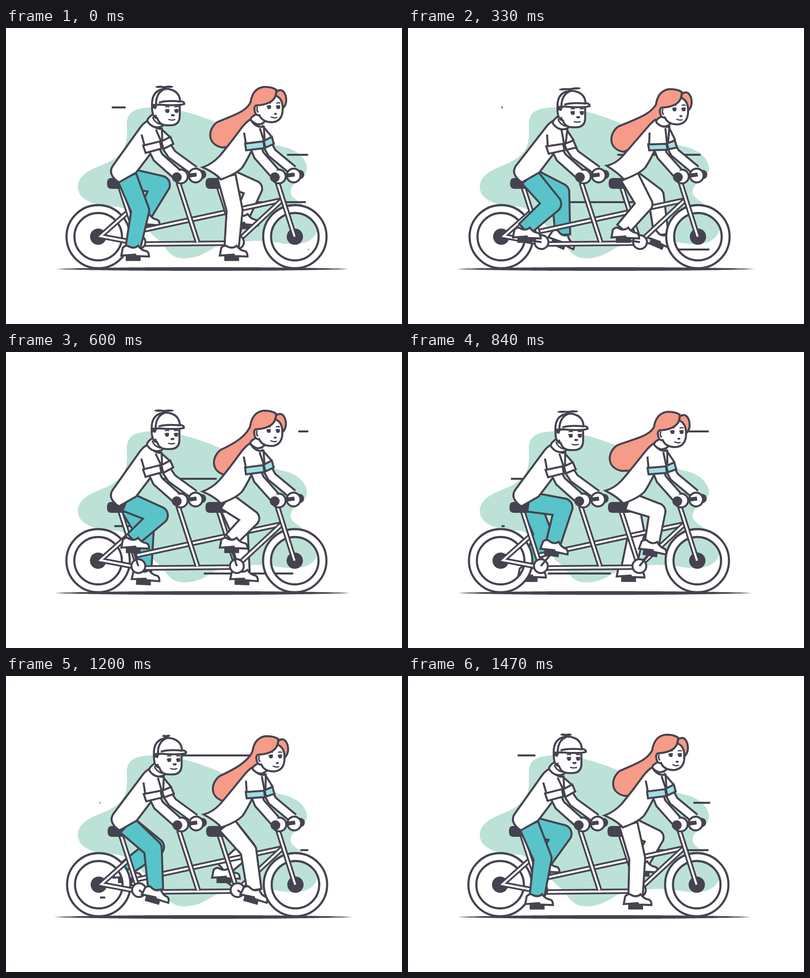
An HTML page with a canvas for the animation above (1.5 s loop, 800 by 600 pixels).

```html
<!DOCTYPE html>
<html lang="en">
<head>
<meta charset="utf-8">
<title>Tandem ride</title>
<style>
html, body { margin: 0; width: 100%; height: 100%; overflow: hidden; background: #fff }
canvas { display: block }
</style>
</head>
<body>
<canvas id="stage" width="800" height="600"></canvas>
<script>
const ctx = document.getElementById('stage').getContext('2d');
const INK = '#45434f', WHITE = '#fff', TEAL = '#58c4c9', MINT = '#bce2d8', CORAL = '#f59b88', AQUA = '#9fdfe2';
const LOOP = 1500, RAD = Math.PI / 180;

const wave = (t, peak) => Math.cos((t - peak) / 750 * 2 * Math.PI);

function shape(d, fill, width = 4) {
  const path = new Path2D(d);
  if (fill) { ctx.fillStyle = fill; ctx.fill(path); }
  if (width) { ctx.strokeStyle = INK; ctx.lineWidth = width; ctx.stroke(path); }
}

function disc(x, y, r, fill = INK, width = 0, ry = r) {
  ctx.beginPath();
  ctx.ellipse(x, y, r, ry, 0, 0, 7);
  ctx.fillStyle = fill;
  ctx.fill();
  if (width) { ctx.strokeStyle = INK; ctx.lineWidth = width; ctx.stroke(); }
}

// A white bar with an outline on both sides.
function tube(d, outer = 11, inner = 4) {
  const path = new Path2D(d);
  for (const [color, width] of [[INK, outer], [WHITE, inner]]) {
    ctx.strokeStyle = color;
    ctx.lineWidth = width;
    ctx.stroke(path);
  }
}

function at(x, y, angle, draw) {
  ctx.save();
  ctx.translate(x, y);
  ctx.rotate(angle);
  draw();
  ctx.restore();
}

function speedLine(t, y, delay) {
  const local = 420 + ((t - delay - 420) % LOOP + LOOP) % LOOP;
  const u = Math.min(1, (local - 420) / 1280);
  const head = 611 - 211 * (1 - Math.cos(Math.PI * u));
  const tail = 611 - 422 / (1 + Math.exp((1310 - local) / 98));
  if (tail - head > .3) shape(`M${head} ${y}H${tail}`);
}

function wheel(x) {
  const ring = new Path2D();
  ring.arc(x, 423, 64, 0, 7);
  ring.closePath();
  ring.moveTo(x + 48, 423);
  ring.arc(x, 423, 48, 0, 7);
  ring.closePath();
  ctx.fillStyle = WHITE;
  ctx.fill(ring, 'evenodd');
  ctx.strokeStyle = INK;
  ctx.lineWidth = 4.3;
  ctx.stroke(ring);
  disc(x, 423, 16.5);
}

// Two tapered segments joined by a round knee, outlined as one silhouette.
function limb(joints, radii, fill) {
  ctx.beginPath();
  for (let i = 0; i < 2; i++) {
    const [x, y] = joints[i], [x2, y2] = joints[i + 1], len = Math.hypot(x2 - x, y2 - y);
    const nx = (y2 - y) / len, ny = (x - x2) / len, r = radii[i], r2 = radii[i + 1];
    ctx.moveTo(x + nx * r, y + ny * r);
    ctx.lineTo(x - nx * r, y - ny * r);
    ctx.lineTo(x2 - nx * r2, y2 - ny * r2);
    ctx.lineTo(x2 + nx * r2, y2 + ny * r2);
    ctx.closePath();
  }
  const [kx, ky] = joints[1], r = radii[1];
  ctx.moveTo(kx + r, ky);
  ctx.arc(kx, ky, r, 0, 2 * Math.PI, true);
  ctx.strokeStyle = INK;
  ctx.lineWidth = 8;
  ctx.stroke();
  ctx.fillStyle = fill;
  ctx.fill();
}

const man = {
  crank: 268.5, hip: [246, 304], radii: [18, 16, 13], pants: TEAL,
  knee: [296, 18.5, 10.6, 345, -22.7, -14.7]
};
const woman = {
  crank: 467.5, hip: [447, 303], radii: [16.5, 14, 12.5], pants: WHITE,
  knee: [485.5, 16.4, 13.5, 348.5, -19.2, -11.6]
};

function leg(rider, deg) {
  const a = deg * RAD, s = Math.sin(a), c = Math.cos(a);
  const px = rider.crank + 34 * s, py = 434 - 34 * c;
  const tilt = 24 * Math.max(0, s) ** 2 * RAD;
  const [x, xc, xs, y, yc, ys] = rider.knee;
  const knee = [
    x + xc * c + xs * s + 3 * Math.cos(2 * a - 230 * RAD),
    y + yc * c + ys * s + 4 * Math.cos(2 * a - 290 * RAD)
  ];
  shape(`M${rider.crank} 434L${px} ${py}`, null, 4);
  limb([rider.hip, knee, [px + 23 * Math.sin(tilt), py - 23 * Math.cos(tilt)]], rider.radii, rider.pants);
  at(px, py, tilt, () => {
    ctx.fillStyle = INK;
    ctx.fillRect(-15, -7, 30, 13);
    shape('M-24-5L-21-21Q-14-28-8-23Q2-18 10-25Q17-15 27-14Q32-12 32-3L6-4L4-7Z', WHITE);
  });
}

function bike() {
  wheel(187.2);
  wheel(584.5);
  tube('M247 373L192 422L266 436');
  tube('M268 438L468 436');
  tube('M266 412L557 349');
  tube('M468 433L557 350');
  tube('M349 313L388 434');
  for (const x of [0, 199]) {
    tube(`M${231 + x} 320L${267 + x} 432`);
    shape(`M${213 + x} 304H${246 + x}Q${256 + x} 316 ${260 + x} 323Q${247 + x} 327 ${232 + x} 326H${213 + x}Q${205 + x} 326 ${205 + x} 315Q${205 + x} 304 ${213 + x} 304`, INK, 0);
  }
  tube('M549 312L584 423', 11, 4);
  for (const { crank } of [man, woman]) disc(crank, 434, 14, WHITE, 4);
}

// Outstretched arms, with hands around a handlebar that starts at x.
function farArm(d, x) {
  disc(x + 50, 297, 9.5);
  tube(d, 22, 14);
  disc(x + 38, 299, 14, WHITE, 4);
  shape(`M${x + 18} 300L${x + 40} 297`, null, 8);
}
function nearArm(d, x) {
  tube(d, 25, 17);
  disc(x + 8, 301, 14, WHITE, 4);
  ctx.strokeStyle = WHITE;
  ctx.lineWidth = 16;
  ctx.stroke(new Path2D(d));
  disc(x, 302.5, 10);
}

function face(x, y) {
  for (const dx of [0, 18.5]) {
    disc(x + dx, y, 4, INK, 0, 4);
    shape(`M${x + dx - 5} ${y - 2}L${x + dx + 4} ${y - 3}`, null, 2);
    shape(`M${x + dx - 4} ${y - 8}Q${x + dx} ${y - 10} ${x + dx + 4} ${y - 8}`, null, 2.5);
  }
}

function manBody(t, c) {
  const k = 3 * c;
  farArm('M326 241L336 256L381 289', 346);
  shape(`M${314 + k} 202L333 ${224 + k}L318 238L${308 + k} 230Z`, WHITE);
  shape(`M${291 + k} 187Q${281 + k} 192 ${274 + k} 202L217 279Q205 296 229 313L264 293L292 256L317 238L${318 + k} 204Q${304 + k} 207 ${291 + k} 187`, WHITE);
  nearArm('M300 246L308 262L345 295', 346);
  shape(`M${277 + k} 216L281 238L313 ${231 + k}L${306 + k} 206L${288 + k} 210`, WHITE, 0);
  shape(`M${277 + k} 216L281 239M${306 + k} 206L314 ${231 + k}`);
  shape(`M278 ${239 + c}L312 ${232 + k}L315 ${246 + 2 * c}L283 ${254 + c}Z`, WHITE);
  shape(`M315 ${232 + k}L333 ${224 + 1.5 * k}L339 ${238 + 1.5 * k}L319 ${246 + c}Z`, WHITE);

  ctx.save();
  ctx.translate(2.9 * c, 2.5 * c);
  shape('M305 172L294 181Q286 188 290 193Q302 208 318 201L326 194', WHITE);
  shape('M299 182Q303 194 316 197', null, 3);
  shape('M354 154V180Q354 199 335 199H329Q313 199 309 185Q298 184 298 161L300 155Z', WHITE);
  shape('M299 157L299 163L305 165L309 156', INK, 2);
  shape('M305 178L307 184', null, 4);
  face(329, 170);
  disc(340, 178.5, 4, INK, 0, 2.3);
  shape('M331 187Q339 190 345 187', null, 2.5);
  shape('M298 158Q297 126 327 125Q353 127 355 150Q364 151 363 156Q350 160 311 157Z', WHITE);
  shape('M325 125Q306 132 306 157M312 153Q328 148 356 151', null, 4);
  const spread = 23.5 * Math.cos((.72 * t - 40) * RAD);
  at(323, 121.5, -2 * (1 + c) * RAD, () => {
    const w = Math.max(4, Math.abs(spread) / 2);
    disc(-w, -.5, w, INK, 0, 2.3);
    disc(w, -.5, w, INK, 0, 2.3);
    disc(0, 1, 4.5, INK, 0, 3);
  });
  ctx.restore();
}

function womanBody(t, c) {
  const k = 3 * c, hx = 2.9 * c, hy = 2.7 * c;
  const ex = 412.5 - 7.5 * wave(t, 180) - 1.3 * c, ey = 221.5 - 6.5 * wave(t, 75);
  shape(`M${499 + hx} ${148 + hy}C${491 + hx} ${173 + hy} ${ex + 42} ${ey - 38} ${ex + 14} ${ey - 25}C${ex - 5} ${ey - 10} ${ex - 6} ${ey + 20} ${ex + 25} ${ey + 26}L460 240L${515 + hx} ${184 + hy}V150Z`, CORAL);
  farArm('M530 238L538 253L580 288', 544);
  shape(`M${522 + k} 199L538 ${223 + k}L526 238L${514 + k} 230Z`, WHITE);
  shape(`M${497 + k} 185Q${489 + k} 190 ${480 + k} 201Q450 239 432 260Q417 276 ${399 + c} ${281 - 2 * c}Q424 294 435 307Q466 296 478 283Q485 273 497 249L524 236L${524 + k} 200Q${507 + k} 203 ${497 + k} 185`, WHITE);
  nearArm('M506 243L512 258L543 293', 544);
  shape(`M${484 + k} 212L486 234L521 ${231 + k}L${516 + k} 203Z`, WHITE, 0);
  shape(`M${484 + k} 212L486 236M${516 + k} 203L522 ${231 + k}`);
  shape(`M484 ${235 + c}L521 ${232 + k}L523 ${245 + 2 * c}L486 248Z`, AQUA);
  shape(`M522 ${231 + k}L538 ${224 + 1.5 * k}L542 ${238 + 1.5 * k}L525 ${244 + 2 * c}Z`, AQUA);

  ctx.save();
  ctx.translate(hx, hy);
  shape('M512 174L500 182Q495 188 500 191Q512 202 523 194L530 188', WHITE);
  shape('M562 146V168Q561 191 541 193Q521 193 515 179Q504 180 505 160L515 146L549 130Z', WHITE);
  shape('M511 161Q508 170 513 173M514 177L517 182', null, 3);
  shape('M549 131Q562 122 568 139Q572 156 562 165Q562 144 548 139Z', CORAL);
  shape('M499 150Q501 125 523 121.5Q540 121 549 127Q551 157 508 159Q503 162 505 168L497 171Z', CORAL, 0);
  shape('M497 153Q501 125 523 121.5Q540 121 549 127Q551 157 508 159Q504 162 505 168');
  face(534.5, 162.5);
  disc(547.5, 176, 3, INK, 0, 2);
  shape('M538 182Q546 186 551 183', null, 2.5);
  ctx.restore();
}

const BACKDROP = 'M244 198C243 165 268 161 300 161C365 163 425 190 465 210C505 226 535 235 565 242C596 251 608 270 608 285C606 309 575 310 575 333C576 353 630 361 630 405C626 431 602 440 571 438C545 436 530 430 495 432C465 433 438 436 421 445C402 456 389 466 362 467C325 467 327 443 300 423C275 400 260 370 225 362C190 361 145 354 145 321C147 292 183 283 205 273C247 252 245 228 244 198';

function render(t) {
  const c = wave(t, 285), angle = 198 + .24 * t;
  ctx.fillStyle = WHITE;
  ctx.fillRect(0, 0, 800, 600);
  shape(BACKDROP, MINT, 0);
  speedLine(t, 161, 0);
  speedLine(t, 257, 815);
  speedLine(t, 353, 620);
  speedLine(t, 449, 1040);

  ctx.save();
  ctx.translate(1.3 * c, 0);
  leg(man, angle + 180);
  leg(woman, angle + 180);
  bike();
  leg(man, angle);
  leg(woman, angle);
  manBody(t, c);
  womanBody(t, c);
  ctx.restore();

  const left = 99.3 + 2.2 * wave(t, 60), right = 696 + 4 * wave(t, 375);
  shape(`M${left} 488.5C${left + 110} 483.5 ${right - 110} 483.5 ${right} 488.5C${right - 110} 493.5 ${left + 110} 493.5 ${left} 488.5`, INK, 0);
}

function tick() {
  render(performance.now() % LOOP);
  requestAnimationFrame(tick);
}
tick();
</script>
</body>
</html>
```
